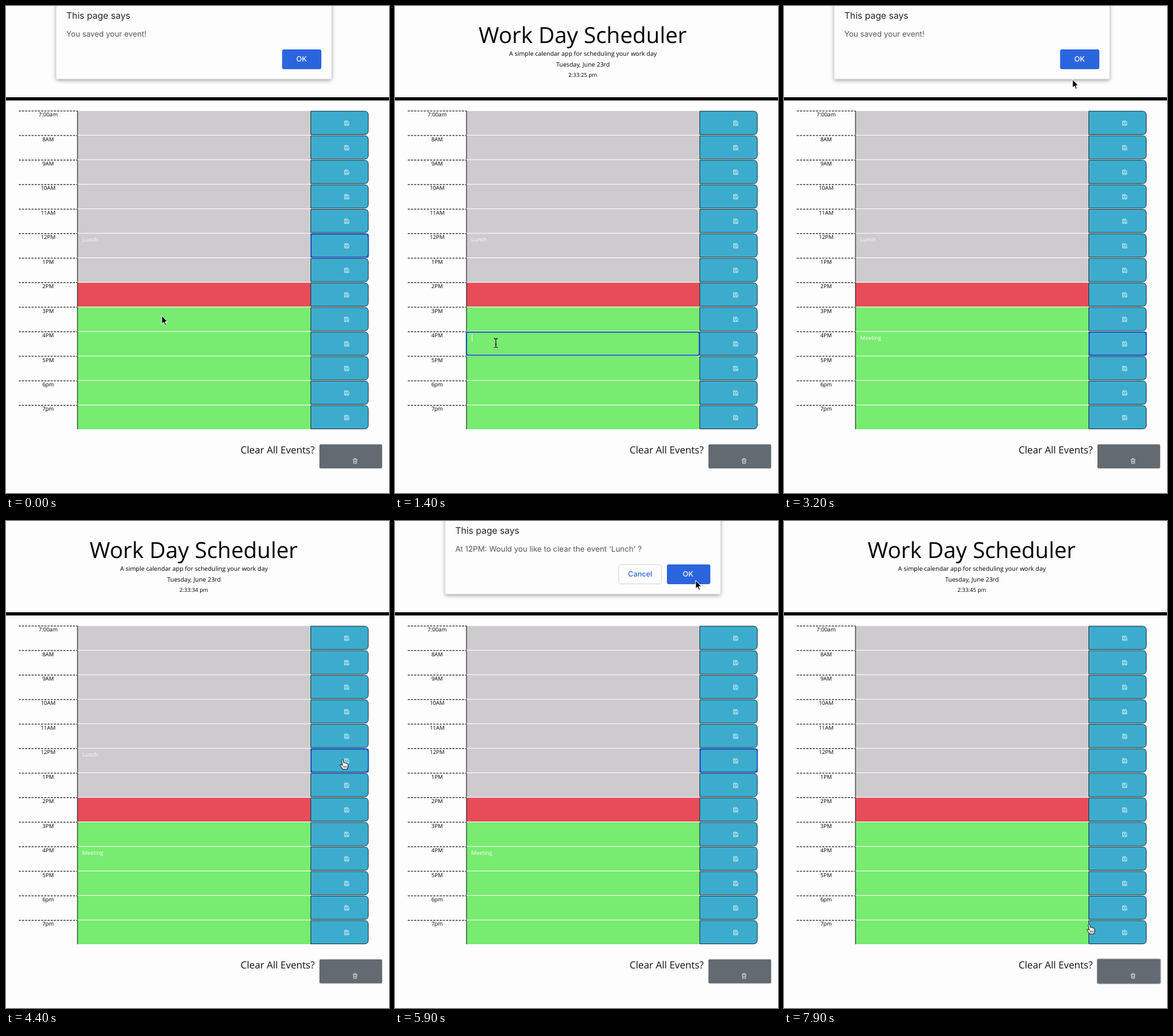
Write an HTML page that moves like this. It is 600 px wide and 763 px high and loops after 8000 ms.

```html
<!DOCTYPE html>
<html lang="en">
<head>
<meta charset="utf-8">
<title>Work Day Scheduler</title>
<style>
html, body { margin: 0; width: 100%; height: 100%; overflow: hidden; background: #fefdfe; }
svg { display: block; width: 600px; height: 763px; }
text { font-family: "Open Sans", "Noto Sans", sans-serif; text-rendering: geometricPrecision; }
.ui { font-family: Inter, "Liberation Sans", sans-serif; }
.mid { text-anchor: middle; }
</style>
</head>
<body>
<svg id="stage" viewBox="0 0 600 763"></svg>
<script>
const LOOP = 8000, STEP = 100, TOP = 164.5, PITCH = 38.43;
const LABELS = ['7:00am', '8AM', '9AM', '10AM', '11AM', '12PM', '1PM', '2PM', '3PM', '4PM', '5PM', '6pm', '7pm'];
const NOON = 5, FOUR = 9;
const rowTop = i => TOP + PITCH * i;
const rowColor = i => i < 7 ? '#cdcbcd' : i === 7 ? '#e74c58' : '#77ec70';

const stage = document.getElementById('stage');
function add(parent, tag, attrs = {}, content) {
  const node = document.createElementNS('http://www.w3.org/2000/svg', tag);
  for (const key in attrs) node.setAttribute(key, attrs[key]);
  if (content) node.textContent = content;
  parent.appendChild(node);
  return node;
}
const set = (node, attrs) => { for (const key in attrs) node.setAttribute(key, attrs[key]); };
const show = (node, on) => node.setAttribute('visibility', on ? 'visible' : 'hidden');
const rect = (parent, x, y, width, height, attrs) => add(parent, 'rect', { x, y, width, height, ...attrs });
const label = (parent, content, x, y, size, attrs) =>
  add(parent, 'text', { x, y, 'font-size': size, ...attrs }, content);
const between = (t, a, b) => t >= a && t < b;

// Header
const centered = { class: 'mid' };
label(stage, 'Work Day Scheduler', 294, 58, 34.7, centered);
label(stage, 'A simple calendar app for scheduling your work day', 294.5, 77.7, 9.6, centered);
label(stage, 'Tuesday, June 23rd', 294.5, 94.7, 9.6, centered);
const clock = label(stage, '', 294.2, 111.3, 8.65, centered);
rect(stage, 0, 143, 600, 5);

// Hour rows
const notes = LABELS.map((name, i) => {
  const y = rowTop(i);
  add(stage, 'path', { d: `M20 ${y}H112`, stroke: '#000', 'stroke-dasharray': '3.4 1.6' });
  label(stage, name, 66, y + 8.7, 8.65, centered);
  rect(stage, 112, y, 365, 37.4, { fill: rowColor(i) });
  add(stage, 'path', { d: `M112 ${y}v37.4`, stroke: '#111' });
  add(stage, 'path', {
    d: `M477.5 ${y + .3}h84q6 0 6 6v24.6q0 6 -6 6h-84z`,
    fill: '#3cacce', stroke: '#12242b', 'stroke-width': .9
  });
  add(stage, 'path', {
    d: `M530.4 ${y + 15.7}h5l1.6 1.6v5.2h-6.6zM532 ${y + 15.7}v2.2h3v-2.2M532 ${y + 22.4}v-2.3h3.4v2.3`,
    fill: 'none', stroke: '#e9f7fb', 'stroke-width': .8
  });
  return label(stage, '', 119.6, y + 12.4, 8.65, { fill: '#fff' });
});
const ring = rect(stage, 0, 0, 0, 0, { rx: 3, fill: 'none', stroke: '#1d52c6', 'stroke-width': 1.8 });
const caret = rect(stage, 0, 0, .9, 11.5, { fill: '#fff' });

// Clear button
label(stage, 'Clear All Events?', 367.5, 701, 15.35, { fill: '#111' });
const clearGlow = rect(stage, 490, 685.5, 100.5, 40, { rx: 3, fill: '#999da1' });
const clearButton = rect(stage, 491, 686.8, 98.3, 37.6, { rx: 2 });
add(stage, 'path', {
  d: 'M543.3 710.3h7M545.5 710v-1h2.6v1M544.2 710.3l.4 6.3h4.6l.4-6.3M546 712v3M547.8 712v3',
  fill: 'none', stroke: '#f2f2f2', 'stroke-width': .8
});

// Browser dialog
const dialog = add(stage, 'g');
dialog.style.filter = 'drop-shadow(0 2px 3px rgba(0,0,0,.38))';
rect(dialog, 78.7, -10, 431.3, 124.5, { rx: 2, fill: '#fefdfe' });
const words = add(stage, 'g');
label(words, 'This page says', 94.5, 20, 14.1, { class: 'ui', fill: '#202124' });
const message = label(words, '', 94.5, 48, 12, { class: 'ui', fill: '#555659' });
const okBox = rect(words, 432.5, 68, 61.5, 31, { rx: 3, fill: '#2b65dd' });
const okText = label(words, 'OK', 463, 87.3, 11.4, { class: 'ui mid', fill: '#fff', 'font-weight': 500 });
const cancel = add(words, 'g');
rect(cancel, 350.5, 68.5, 67, 30, { rx: 3, fill: '#fefdfe', stroke: '#d5d8de' });
label(cancel, 'Cancel', 384, 87.3, 11.4, { class: 'ui mid', fill: '#2b65dd', 'font-weight': 500 });

// Pointers; each shape has its hot spot at 0,0
const pointers = {
  arrow: 'M0 0V13.2L3 10.5L5.1 15.3L7.2 14.4L5.1 9.8H9.2Z',
  beam: 'M-3 -7Q-.7 -7 0 -6Q.7 -7 3 -7M0 -6V6M-3 7Q-.7 7 0 6Q.7 7 3 7M-1.5 1.8H1.5',
  hand: 'M-1.5 .8Q-.3 -1.2 1 .8L2.2 5.2Q3.6 4 4.6 5.5Q6 4.6 6.8 6.1Q8.6 5.7 8.9 7.6L8.7 11L7.4 15H1L-3.2 9.6Q-4 7.2 -1.8 7.8L.2 9.2Z'
};
for (const name in pointers) {
  const d = pointers[name], group = add(stage, 'g');
  if (name === 'beam') {
    add(group, 'path', { d, fill: 'none', stroke: '#fff', 'stroke-width': 2.6, opacity: .6 });
    add(group, 'path', { d, fill: 'none', stroke: '#111', 'stroke-width': 1.3 });
  } else {
    const isHand = name === 'hand';
    add(group, 'path', {
      d, fill: isHand ? '#fff' : '#000', stroke: isHand ? '#111' : '#fff', 'stroke-width': 1, 'stroke-linejoin': 'round'
    });
    if (isHand) add(group, 'path', { d: 'M2.2 9.5v3.2M4.2 9.5v3.2M6.2 9.5v3.2', stroke: '#111', 'stroke-width': .8 });
  }
  pointers[name] = group;
}

// Pointer stops: time, x, y
const TRACK = [
  [0, 244, 485], [500, 158, 528], [2200, 158, 528], [2700, 528, 524], [2850, 528, 524],
  [3200, 452, 115], [3300, 460, 88], [3500, 460, 88], [4200, 527, 374], [4500, 527, 374],
  [4800, 190, 374], [5100, 190, 374], [5400, 527, 374], [5550, 527, 374], [5850, 471, 93],
  [6400, 471, 93], [6900, 543, 702], [7250, 543, 702], [7450, 462, 85], [7600, 462, 85], [7900, 478, 632]
];
function pointerAt(t) {
  const i = TRACK.findIndex(stop => stop[0] > t);
  if (i < 0) return TRACK[TRACK.length - 1].slice(1);
  const [t0, x0, y0] = TRACK[i - 1], [t1, x1, y1] = TRACK[i];
  const u = (t - t0) / (t1 - t0), k = u * u * (3 - 2 * u);
  return [x0 + (x1 - x0) * k, y0 + (y1 - y0) * k];
}

const DIALOGS = [
  [0, 200, 'You saved your event!'],
  [2900, 3500, 'You saved your event!'],
  [5600, 6400, "At 12PM: Would you like to clear the event 'Lunch' ?", true],
  [7300, 7600, 'Would you like to clear all events?', true]
];
// Focus spans: start, end, row, whether the text field holds it
const FOCUS = [
  [0, 800, NOON], [800, 2800, FOUR, true], [2800, 4300, FOUR],
  [4300, 4800, NOON], [4800, 5400, NOON, true], [5400, 7000, NOON]
];

function meeting(t) {
  return t >= 7600 ? '' : 'Meeting'.slice(0, Math.max(0, Math.floor((t - 1450) / 110)));
}
function lunch(t) {
  return 'Lunch'.slice(0, Math.max(0, 5 - Math.max(0, Math.floor((t - 4850) / 60))));
}

function drawFocus(t) {
  const focus = FOCUS.find(([a, b]) => between(t, a, b));
  show(ring, focus);
  const typing = focus && focus[3];
  show(caret, typing && Math.floor(t / 200) % 2);
  if (!focus) return;
  const y = rowTop(focus[2]);
  set(ring, { x: typing ? 111.8 : 478, y: y + .6, width: typing ? 365 : 89.6, height: 36.4 });
  set(caret, { x: 120.4 + notes[focus[2]].getComputedTextLength(), y: y + 3.6 });
}

function drawDialog(t) {
  const open = DIALOGS.find(([a, b]) => between(t, a, b));
  const confirm = Boolean(open && open[3]);
  show(dialog, open);
  show(words, open);
  show(cancel, confirm);
  if (open) message.textContent = open[2];
  set(okBox, { x: confirm ? 426 : 432.5, width: confirm ? 68 : 61.5 });
  set(okText, { x: confirm ? 459 : 463 });
  return open;
}

function drawPointer(t, blocked) {
  const [x, y] = pointerAt(t);
  const onRows = !blocked && between(y, TOP, rowTop(13));
  const kind = onRows && between(x, 112, 477) ? 'beam' : onRows && between(x, 477, 568) ? 'hand' : 'arrow';
  for (const name in pointers) {
    show(pointers[name], name === kind);
    set(pointers[name], { transform: `translate(${x} ${y})` });
  }
}

function render(t) {
  const seconds = Math.floor(21 + t * .00305);
  clock.textContent = `2:33:${seconds} pm`;
  notes[NOON].textContent = lunch(t);
  notes[FOUR].textContent = meeting(t);
  drawFocus(t);
  show(clearGlow, t >= 7000);
  set(clearButton, { fill: between(t, 6900, 7300) ? '#4b5356' : '#636a70' });
  drawPointer(t, drawDialog(t));
}

function tick() {
  const t = performance.now() % LOOP;
  render(Math.floor(t / STEP) * STEP);
  requestAnimationFrame(tick);
}
tick();
</script>
</body>
</html>
```
